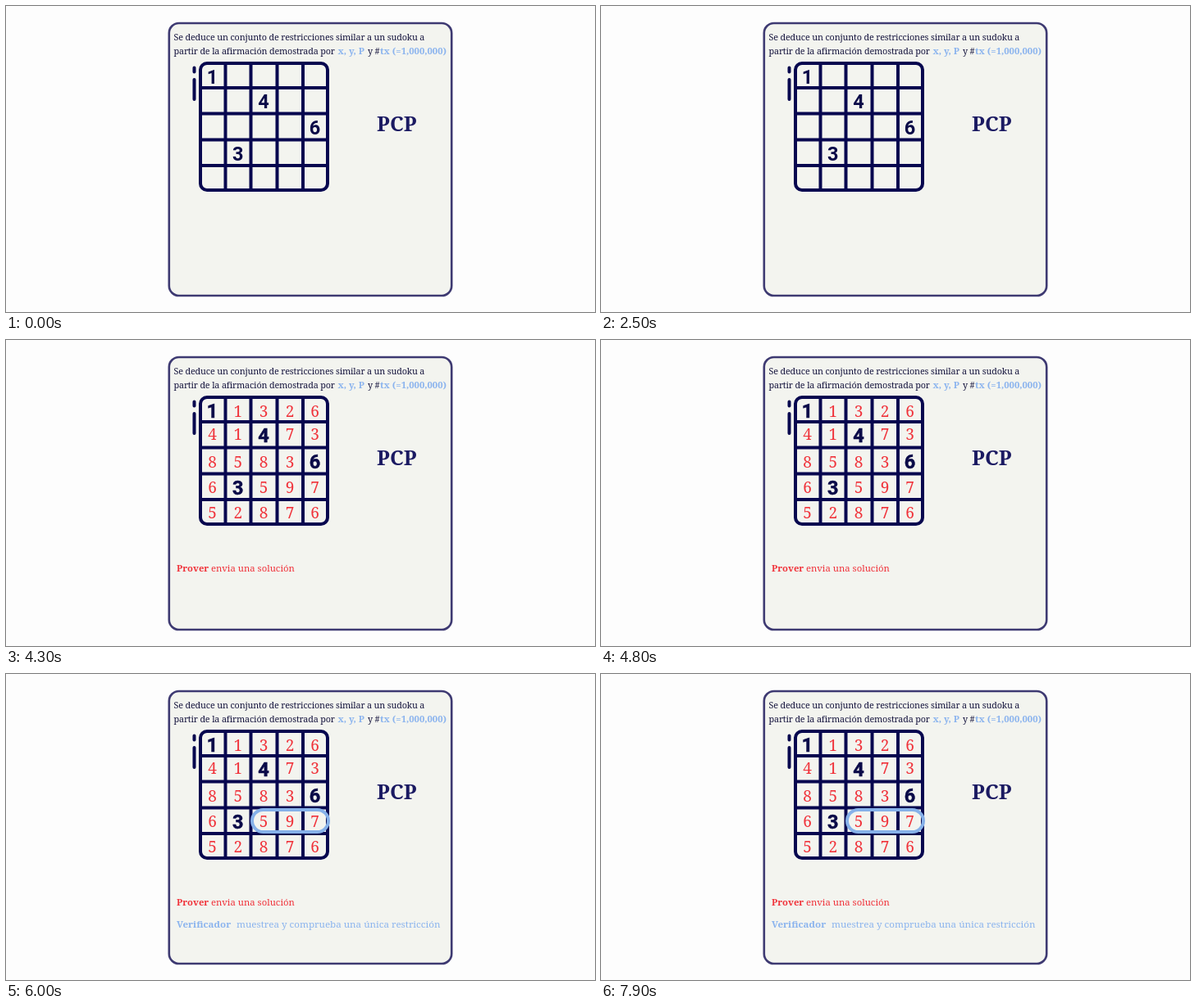
An HTML page for the animation above (8000 ms loop, 718x374 px).

```html
<!DOCTYPE html>
<html lang="es">
<head>
<meta charset="utf-8">
<title>PCP</title>
<style>
  html, body { margin: 0; width: 100%; height: 100%; overflow: hidden; background: #fdfdfd; }
  svg { display: block; }
  text { font-family: "Noto Serif", "Liberation Serif", serif; white-space: pre; }
  .bold { font-weight: 700; letter-spacing: 0; }
  .intro { font-size: 10.8px; letter-spacing: -0.15px; fill: #17163f; }
  .blue { fill: #8bb4ee; }
  .red { fill: #f0323a; }
  .var { font-size: 11.3px; }
  .pcp { font-size: 25px; fill: #1b1a62; text-anchor: middle; }
  .line { fill: none; stroke: #07074f; stroke-width: 4; stroke-linecap: round; }
  .digit { font-size: 19px; text-anchor: middle; }
  .given {
    font: 700 23.5px Roboto, "Liberation Sans", sans-serif;
    text-anchor: middle; fill: #0a0a48; stroke: #0a0a48; stroke-width: 0;
    animation: thicken 8s step-end infinite;
  }
  .solution { animation: solve 8s step-end infinite; }
  .check { animation: check 8s step-end infinite; }
  @keyframes solve { 0% { opacity: 0; } 50%, 100% { opacity: 1; } }
  @keyframes check { 0% { opacity: 0; } 73.75%, 100% { opacity: 1; } }
  @keyframes thicken { 0% { stroke-width: 0; } 50%, 100% { stroke-width: 0.5px; } }
</style>
</head>
<body>
<svg width="718" height="374" viewBox="0 0 718 374">
  <rect x="198.8" y="21" width="344.4" height="333" rx="12" fill="#f3f4ef" stroke="#3e3a72" stroke-width="2.6"/>

  <text class="intro" x="204.5" y="42">Se deduce un conjunto de restricciones similar a un sudoku a</text>
  <text class="intro" y="58.5"><tspan x="204.5">partir de la afirmación demostrada por</tspan><tspan
    class="bold blue var" x="404.5">x, y, P</tspan><tspan x="441">y</tspan><tspan x="449.5">#</tspan><tspan
    class="bold blue var" x="456">tx (=1,000,000)</tspan></text>

  <text class="bold pcp" x="476.3" y="153">PCP</text>

  <path class="line" d="M229.5 75.5V80.5M229.5 90V114" stroke-width="3.6"/>
  <path class="line" style="stroke-linecap:butt" d="M267.5 70V225M298.5 70V225M330.5 70V225M362 70V225M237 100H392M237 131.5H392M237 163.5H392M237 195H392"/>
  <rect class="line" x="237" y="70" width="155" height="155" rx="8"/>
  <g id="givens"></g>

  <g class="solution">
    <g id="digits"></g>
    <text class="red" y="282.5" font-size="11.3"><tspan class="bold" x="208">Prover</tspan><tspan x="250">envia una solución</tspan></text>
  </g>

  <g class="check">
    <rect x="300" y="166" width="93" height="27" rx="13.5" fill="none" stroke="#86b1e9" stroke-width="4"/>
    <text class="blue" y="309.5" font-size="11.6"><tspan class="bold" x="208">Verificador</tspan><tspan x="281">muestrea y comprueba una única restricción</tspan></text>
  </g>
</svg>
<script>
  const cols = [251.5, 282.8, 314, 346, 376.5];
  const rows = [93.5, 122, 155.5, 187, 217.5];
  const answer = ["11326", "41473", "85836", "63597", "52876"];
  const given = { "0,0": 94.5, "1,2": 125, "2,4": 157, "3,1": 188.5 }; // cell: baseline

  function addDigit(parent, cls, x, y, value) {
    const node = document.createElementNS("http://www.w3.org/2000/svg", "text");
    node.setAttribute("class", cls);
    node.setAttribute("x", x);
    node.setAttribute("y", y);
    node.textContent = value;
    document.getElementById(parent).append(node);
  }

  answer.forEach((row, r) => [...row].forEach((value, c) => {
    const baseline = given[r + "," + c];
    if (baseline) addDigit("givens", "given", cols[c], baseline, value);
    else addDigit("digits", "digit red", cols[c], rows[r], value);
  }));
</script>
</body>
</html>
```
